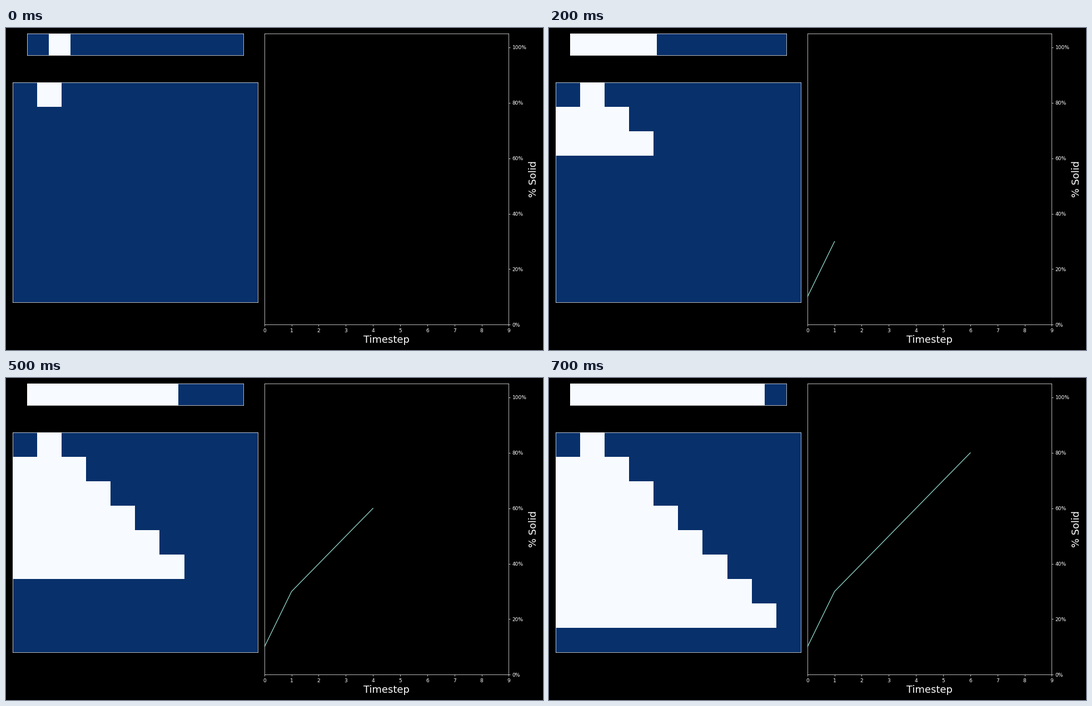
Animation of 966 by 580 pixels, one loop 0.8 s. Source, as a matplotlib script:

```python
import numpy as np
import matplotlib.pyplot as plt
from matplotlib.animation import FuncAnimation
from matplotlib.ticker import PercentFormatter

WIDTH, HEIGHT, DPI = 966, 580, 64
CELLS, STEPS, FRAMES = 10, 9, 8
SMALL, LARGE = 10.07, 20.14

plt.style.use("dark_background")
plt.rcParams["font.family"] = "DejaVu Sans"
fig = plt.figure(figsize=(WIDTH / DPI, HEIGHT / DPI), dpi=DPI)


def add_panel(left, top, right, bottom):
    """Add axes given by pixel edges measured from the top left."""
    return fig.add_axes([left / WIDTH, 1 - bottom / HEIGHT,
                         (right - left) / WIDTH, (bottom - top) / HEIGHT])


def add_grid(box, rows):
    ax = add_panel(*box)
    image = ax.imshow(np.ones((rows, CELLS)), cmap="Blues", vmin=0, vmax=1,
                      aspect="auto", interpolation="nearest")
    ax.set(xticks=[], yticks=[])
    return image


def liquid_cells(step):
    """One seed cell is solid first, then the solid front moves right."""
    cells = np.ones(CELLS)
    if step == 0:
        cells[1] = 0
    else:
        cells[:step + 2] = 0
    return cells


states = np.array([liquid_cells(step) for step in range(STEPS)])
solid_share = 1 - states.mean(axis=1)

strip = add_grid((38.2, 9.8, 426.7, 48.6), 1)
history = add_grid((12.45, 98.1, 452.5, 494.0), STEPS)

chart = add_panel(464.8, 9.9, 904.4, 534.4)
chart.set(xlim=(0, STEPS), ylim=(0, 1.05), xticks=range(STEPS + 1),
          yticks=np.linspace(0, 1, 6))
chart.yaxis.tick_right()
chart.yaxis.set_label_position("right")
chart.yaxis.set_major_formatter(PercentFormatter(1, decimals=0))
chart.tick_params(labelsize=SMALL)
chart.set_xlabel("Timestep", fontsize=LARGE)
chart.set_ylabel("% Solid", fontsize=LARGE)
curve, = chart.plot([], [], color="#8dd3c7", linewidth=1.5)


def update(step):
    strip.set_data(states[step:step + 1])
    visible = np.ones_like(states)
    visible[:step + 1] = states[:step + 1]
    history.set_data(visible)
    # The curve lags one step behind the grids.
    curve.set_data(np.arange(step), solid_share[:step])
    return strip, history, curve


animation = FuncAnimation(fig, update, frames=FRAMES, interval=100,
                          repeat=True, repeat_delay=0)
plt.show()
```
